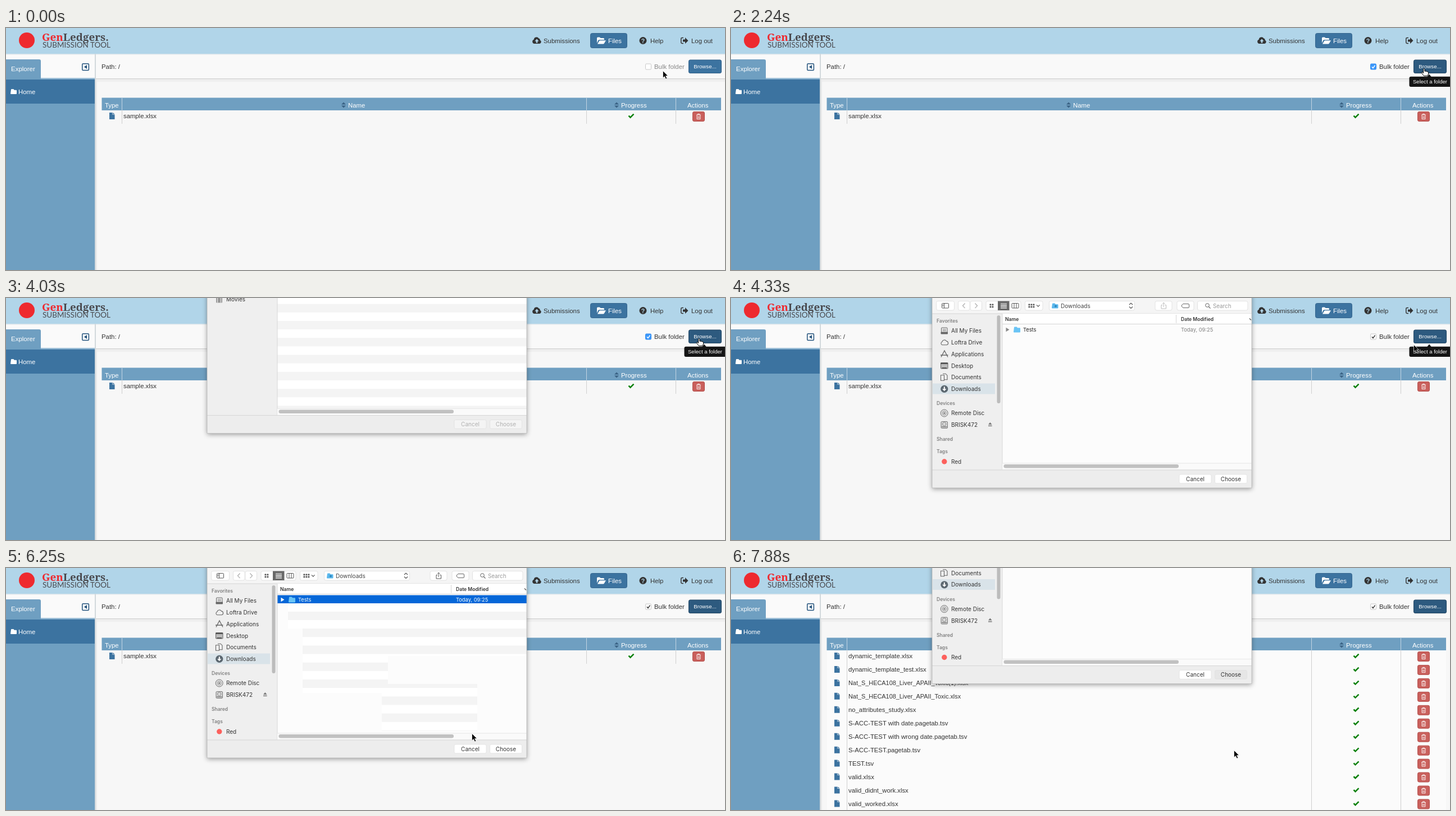
These frames come from a looping animation (1280 by 432 pixels, 8 s). An HTML page:

```html
<!DOCTYPE html>
<html lang="en">
<head>
<meta charset="utf-8">
<title>File upload</title>
<style>
html, body { margin: 0; width: 100%; height: 100%; overflow: hidden; background: #f7f7f7; }
svg { display: block; font-family: "Liberation Sans", Arial, sans-serif; }
#sheet { font-family: Inter, Roboto, sans-serif; }
</style>
</head>
<body>
<svg id="stage" width="1280" height="432" viewBox="0 0 1280 432"></svg>
<script>
const BLUE = '#3c73a0', LIGHT = '#6f9fc1', INK = '#333';

// Markup helpers; text is centred vertically on y
const rect = (x, y, w, h, fill, r = 0, more = '') =>
  `<rect x="${x}" y="${y}" width="${w}" height="${h}" rx="${r}" fill="${fill}" ${more}/>`;
const path = (d, fill, more = '') => `<path d="${d}" fill="${fill}" ${more}/>`;
const line = (d, stroke, width = 1) => path(d, 'none', `stroke="${stroke}" stroke-width="${width}"`);
const circle = (x, y, r, fill, more = '') => `<circle cx="${x}" cy="${y}" r="${r}" fill="${fill}" ${more}/>`;
const text = (x, y, str, size = 11.4, fill = INK, more = '') =>
  `<text x="${x}" y="${y + size * .36}" font-size="${size}" fill="${fill}" ${more}>${str}</text>`;
const group = (id, body, more = '') => `<g id="${id}" ${more}>${body}</g>`;
const at = (x, y, body) => `<g transform="translate(${x} ${y})">${body}</g>`;
const edge = color => `stroke="${color}"`;
const MIDDLE = 'text-anchor="middle"', BOLD = 'font-weight="600"';

const folder = (x, y, w, h, fill) =>
  path(`M${x} ${y + 1}q0-1 1-1h${w * .3}l1.5 1.7h${w * .7 - 4.5}q1 0 1 1v${h - 3.7}q0 1-1 1h${2 - w}q-1 0-1-1z`, fill);

function header() {
  return rect(0, 0, 1280, 46, '#b1d5e9') +
    circle(37, 22, 14, '#ee2a2f') +
    `<text x="64" y="22.5" font-family="Noto Serif, serif" font-weight="700" font-size="18.8" fill="#4a4a4f"><tspan fill="#ee2a2f">Gen</tspan>Ledgers.</text>` +
    text(65, 30.5, 'SUBMISSION TOOL', 13.5, '#4a4a4f', 'font-family="Lato, sans-serif"') +
    path('M940.5 28a3.7 3.7 0 0 1-.8-7.2a4.7 4.7 0 0 1 8.7-2.3a3 3 0 0 1 2.3 3.2a3.3 3.3 0 0 1-.7 6.3z', INK) +
    path('M945 19.5l3.6 4h-2.2v3h-2.8v-3h-2.2z', '#b1d5e9') +
    text(957, 22.5, 'Submissions') +
    rect(1040.5, 9.5, 65, 26, BLUE, 3, edge('#34658e')) +
    path('M1052 27v-9q0-1.5 1.5-1.5h3.5l1.5 1.5h5q1.5 0 1.5 1.5v1.5h-8.5q-1.5 0-2.3 1zM1053 28.5l3.2-5.5q.5-.8 1.5-.8h10.3l-3.3 5.5q-.5.8-1.5.8z', '#fff') +
    text(1072, 22.5, 'Files', 11.4, '#fff') +
    circle(1134, 22.5, 6.5, INK) +
    text(1134, 22.8, '?', 10.5, '#b1d5e9', MIDDLE + ' font-weight="700"') +
    text(1147, 22.5, 'Help') +
    line('M1206 17.5h-2.5q-1.7 0-1.7 1.7v6.6q0 1.7 1.7 1.7h2.5', INK, 1.5) +
    path('M1205 20.5h4v-3.5l5.5 5.5-5.5 5.5v-3.5h-4z', INK) +
    text(1220, 22.5, 'Log out');
}

function sidebar() {
  return rect(0, 46, 158, 44, '#fafafa') +
    path('M0 56h59q3 0 3 3v31h-62z', LIGHT) +
    rect(0, 89, 158, 343, LIGHT) + rect(62, 89, 96, 2, '#9fc0d8') +
    rect(0, 92, 158, 43, BLUE) +
    text(9, 73, 'Explorer', 11.5, '#fff') +
    rect(135.8, 63.8, 11.6, 11.6, 'none', 1.5, edge('#23527c') + ' stroke-width="1.5"') +
    path('M144 66v7l-5-3.5z', '#23527c') +
    folder(9, 109, 11, 9, '#fff') + text(22, 113.5, 'Home', 11.4, '#fff');
}

function pathBar() {
  return rect(160, 46, 1120, 44, '#f9f9f9') +
    rect(0, 46, 1280, 1.5, '#dce6ec') +
    rect(160, 90, 1120, 1.5, '#cfcfcf') + rect(160, 91.5, 1120, 4.5, '#efefef') +
    rect(158, 46, 2, 386, '#d2d8dc') + rect(160, 92, 2, 340, '#ececec') +
    text(170, 69, 'Path: /') +
    rect(1138.5, 64, 10, 10, '#fcfcfc', 1.5, 'id="box"') +
    path('M1141 69.3l2 2.3 3.5-5', 'none', 'id="tick" stroke-width="1.5"') +
    text(1154, 69, 'Bulk folder', 11.4, INK, 'id="bulk"') +
    rect(1215.5, 57, 58, 23.5, BLUE, 2.5, 'id="browse"') +
    text(1244.5, 69, 'Browse...', 9.7, '#fff', MIDDLE);
}

function tableRow(name, i) {
  return at(0, 157 + i * 23.95,
    path('M184-6h5.5v3.5h4v8.5h-9.5zM190.3-6l3.2 2.8h-3.2z', BLUE) +
    text(209, 0, name, name[0] == 'N' ? 10.9 : 11.3) +
    line('M1108.5-.3l3 3 6-6', '#0a800a', 2.5) +
    rect(1222.5, -7.5, 21, 17, '#c9605c', 2.5, edge('#b5504d')) +
    line('M1229-2h8M1231.5-2v-1.5h3v1.5M1230-1.5v7h6v-7M1232 .5v3.5M1234 .5v3.5', '#fff', .9));
}

const columns = (y, h, fill) => [206, 1033, 1192].map(x => rect(x, y, 1, h, fill)).join('');
const sorter = x => path(`M${x} 136.5l4-4 4 4zM${x} 138.5l4 4 4-4z`, '#3a6284');

const uploaded = ['dynamic_template.xlsx', 'dynamic_template_test.xlsx', 'Nat_S_HECA108_Liver_APAII_Toxic(1).xlsx',
  'Nat_S_HECA108_Liver_APAII_Toxic.xlsx', 'no_attributes_study.xlsx', 'S-ACC-TEST with date.pagetab.tsv',
  'S-ACC-TEST with wrong date.pagetab.tsv', 'S-ACC-TEST.pagetab.tsv', 'TEST.tsv', 'valid.xlsx',
  'valid_didnt_work.xlsx', 'valid_worked.xlsx'];

function table() {
  return rect(170.5, 124.5, 1102.5, 22.5, LIGHT) + columns(125, 22, '#c3d5e3') +
    text(176, 137.5, 'Type', 11.4, '#fff') + sorter(597) + text(609, 137.5, 'Name', 11.4, '#fff') +
    sorter(1083) + text(1095, 137.5, 'Progress', 11.4, '#fff') + text(1213, 137.5, 'Actions', 11.4, '#fff') +
    group('before', columns(147, 24, '#cfcfcf') + tableRow('sample.xlsx', 0)) +
    group('after', rect(171, 147, 1102, 285, '#fbfbfb') + columns(147, 285, '#cfcfcf') + uploaded.map(tableRow).join(''));
}

// Every second row of the file list is grey
const ROW = 15.15, LIST_TOP = 47.5;
function stripes(x, y, w, h) {
  let out = rect(x, y, w, h, '#fff');
  for (let row = LIST_TOP; row < y + h; row += 2 * ROW) {
    const top = Math.max(y, row), bottom = Math.min(y + h, row + ROW);
    if (bottom > top) out += rect(x, top, w, bottom - top, '#f4f4f4');
  }
  return out;
}

function toolbar() {
  const button = (x, w) => rect(x, 5.5, w, 16.5, '#fff', 3, edge('#e2e2e2'));
  const grid = (x, y, n) => [...Array(n * 2)].map((_, i) =>
    rect(x + i % n * 4, y + (i / n | 0) * 4, 2.8, 2.8, '#555', .5)).join('');
  return rect(358, 0, 569, 28, '#f5f5f5') + rect(358, 27.5, 569, 1, '#d3d3d3') +
    button(365.5, 32) + rect(375.5, 9.5, 12, 8.5, 'none', 1, edge('#555')) + line('M379.5 9.5v8.5M376.5 12h2M376.5 14h2', '#555') +
    button(404.5, 20.5) + button(426, 20.5) +
    line('M416.5 9.5l-4 4.3 4 4.3M434.5 9.5l4 4.3-4 4.3', '#aaa', 1.2) +
    button(454, 62) + rect(475, 5.5, 20.5, 16.5, '#686868') + grid(460.5, 10.5, 2) +
    line('M480 10h11M480 12.6h11M480 15.2h11M480 17.8h11', '#fff', 1.2) +
    rect(500, 9.5, 12, 8.5, 'none', 1, edge('#555')) + line('M504 9.5v8.5M508 9.5v8.5', '#555') +
    button(523.5, 31.5) + grid(529.5, 10.5, 3) + line('M544 12.3l2.8 2.8 2.8-2.8', '#555', 1.2) +
    button(566.5, 152) + folder(572, 9.5, 11.5, 9, '#5ab7ec') + circle(578, 14.5, 2, '#2d86bd') +
    text(587, 14, 'Downloads', 10, '#444') +
    line('M709 12l3-3 3 3M709 15.5l3 3 3-3', '#555', 1.2) +
    button(755, 30) + path('M768 12.5h-2v6.500h8.500v-6.500h-2M770.2 16v-7.500M768 10.300l2.200-2.200 2.200 2.200', 'none', 'id="share"') +
    button(794, 30) + path('M805 10.5h9q1.5 0 1.5 1.5v4q0 1.5-1.5 1.5h-9l-2.5-2v-3z', 'none', edge('#666')) +
    button(830.5, 89.5) + circle(848, 13, 3.3, 'none', edge('#666')) + line('M850.5 15.5l3 3.2', '#666', 1.2) +
    text(858, 14, 'Search', 9.8, '#999');
}

const disk = rect(374, -6, 11.5, 12, '#d9d9d9', 1.5, edge('#777')) +
  circle(379.7, -1.5, 3.2, 'none', edge('#888')) + line('M375 3.5h9.5', '#777', 1.5);
const page = line('M373.5-4h6v9.5h-6zM377-6.5h5l3 3v7.5h-5', '#666', 1.1);
const places = [
  ['All My Files', 58.5, rect(374.5, -5.5, 10.5, 10.5, '#eee', 1, edge('#666')) + rect(373.5, 2, 12.5, 4, '#666', 1) + line('M376.5-2.5h6.5M376.5 0h6.5', '#777')],
  ['Loftra Drive', 79.3, line('M376 4.5a3 3 0 0 1 0-5.7a4 4 0 0 1 7.5-1a3.4 3.4 0 0 1 .5 6.7z', '#666', 1.1)],
  ['Applications', 100, line('M374 5.5l6-11.5 6 11.5M373 2h13.5', '#666', 1.3)],
  ['Desktop', 121, rect(373.5, -5.5, 12.5, 10.5, '#bbb', .5, edge('#666')) + line('M373.5-4h12.5M375.5 4h8.5', '#555', 2)],
  ['Documents', 141.7, page],
  ['Downloads', 162.3, circle(379.8, 0, 6.6, '#5b6770') + path('M378.8-4h2v4h2.7l-3.7 4-3.7-4h2.7z', '#fff')],
  ['Remote Disc', 205.5, circle(379.7, 0, 6.5, '#ddd', edge('#777')) + circle(379.7, 0, 3.5, 'none', edge('#999')) + circle(379.7, 0, 1.5, '#777')],
  ['BRISK472', 226.5, disk],
  ['Red', 292, circle(379.8, 0, 4.7, '#fc605c')]
];

function sheet() {
  const heading = (str, y) => text(366, y, str, 8.5, '#808080', BOLD);
  const title = (x, str) => text(x, 38, str, 8.6, '#333', BOLD);
  const button = (id, x, str) => rect(x, 315, 57, 15.8, '#fff', 2.5, `id="${id}" stroke="#dedede" stroke-width=".7"`) +
    text(x + 28.5, 323, str, 10, INK, `${MIDDLE} class="label"`);
  return rect(358, -20, 569, 359, '#efefef', 0, 'filter="url(#shadow)"') +
    group('loading', stripes(483, 0, 444, 295) +
      rect(374, 94, 11, 12, '#999', 1) + line('M376.5 94v12M382.5 94v12', '#eee') + text(392, 100, 'Movies', 10)) +
    group('loaded',
      rect(483, 28, 444, 267, '#fcfcfc') +
      group('banding', stripes(502, 63, 178, 45) + stripes(680, 63, 247, 94) + stripes(528, 108, 152, 115) + stripes(669, 207, 170, 84)) +
      toolbar() + rect(483, 28, 444, 18, '#fff') + rect(483, 46, 444, 1, '#d5d5d5') + rect(792, 30, 1, 15, '#d5d5d5') +
      title(488, 'Name') + title(801, 'Date Modified') + line('M923 36.5l3 3', '#555', 1.3) +
      rect(483, 48.5, 444, 14.5, '#0567d8', 0, 'id="selected"') +
      path('M489.5 52.8v7.4l6-3.7z', '#8a8a8a', 'id="arrow"') + folder(504, 51.5, 12, 10, '#6ac4f5') +
      group('entry', text(520, 56.5, 'Tests', 9.3, 'inherit') + text(801, 56.5, 'Today, 09:25', 9.3, 'inherit', 'class="date"')) +
      rect(359, 152.5, 111, 19, '#d9e3e9') +
      places.map(([name, y, icon]) => at(0, y, icon + text(392, 0, name, 10))).join('') +
      path('M458 226l3.3-4 3.3 4zM458 227.5h6.6v1.5h-6.6z', '#777') +
      heading('Favorites', 41) + heading('Devices', 188) + heading('Shared', 252) + heading('Tags', 274) +
      rect(473.5, 31, 6, 157, '#bcbcbc', 3)) +
    rect(482.5, 28, 1, 279, '#d8d8d8') +
    rect(483, 295, 444, 12, '#fafafa') + rect(483, 294.5, 444, 1, '#e8e8e8') + rect(485.5, 297, 311.5, 6.6, '#c1c1c1', 3.3) +
    rect(358, 306.5, 569, 32.5, '#ededed') + rect(358, 306.5, 569, 1, '#d6d6d6') +
    button('cancel', 798, 'Cancel') + button('choose', 861.5, 'Choose') +
    line('M358 0v339h569v-339', '#b9b9b9', .8);
}

const stage = document.getElementById('stage');
stage.innerHTML =
  '<defs><filter id="shadow" x="-10%" y="-10%" width="120%" height="125%"><feDropShadow dx="0" dy="2" stdDeviation="4" flood-opacity=".4"/></filter></defs>' +
  rect(0, 0, 1280, 432, '#f7f7f7') + sidebar() + pathBar() + header() + table() +
  group('tip', path('M1239 87.5l4-5 4 5z', '#151515') + rect(1207.5, 86.8, 78, 18.2, '#151515', 3) + text(1214, 96, 'Select a folder', 9.55, '#fff')) +
  group('sheet', sheet()) +
  group('pointer', path('M.5.5v12.500l2.900-2.600 2.100 4.500 2.200-1-2.100-4.400h3.900z', '#000', 'stroke="#fff" stroke-width=".7"')) +
  group('hand', path('M-.5 1.200q1.200-1.700 2.400 0v4q1.200-1 2.200.3 1.200-.8 2.200.5 1.700-.5 2.200 1.200v2.800l-1.700 3.500h-6.300l-3.900-5q-.8-1.600.8-1.800l2.100 1.700z', '#fff', 'stroke="#000"'));

const $ = id => document.getElementById(id);
const show = (id, on) => { $(id).style.display = on ? '' : 'none'; };
const paint = (id, fill, stroke) => { $(id).style.fill = fill; if (stroke) $(id).style.stroke = stroke; };
const held = (keys, t) => keys.findLast(key => key[0] <= t);

// [time, x, y], each pose held until the next
const pointerKeys = [
  [0, 1169, 76], [140, 1154, 73], [290, 1144, 70],
  [1340, 1147, 70], [1490, 1158, 70], [1640, 1176, 70], [1790, 1195, 70], [1940, 1206, 70],
  [2090, 1222, 71], [2240, 1233, 72],
  [4180, 1228, 76], [4330, 1215, 83], [4480, 1168, 118], [4620, 1120, 142],
  [4770, 1010, 128], [4920, 870, 108], [5070, 735, 88], [5210, 620, 70], [5360, 548, 59], [5500, 525, 55],
  [5950, 528, 94], [6100, 669, 208], [6250, 829, 295], [6400, 884, 321], [6540, 901, 328], [6690, 897, 326],
  [6840, 894, 324], [7140, 895, 325]];
const sheetKeys = [[0, -400], [3890, -230], [4030, -97.5], [4180, 0], [7880, -132.5]];

function render(t) {
  const [, x, y] = held(pointerKeys, t);
  const isHand = t >= 2090 && t < 4330;
  show('hand', isHand);
  show('pointer', !isHand);
  $(isHand ? 'hand' : 'pointer').setAttribute('transform', `translate(${x} ${y})`);

  const checked = t >= 1190, inactive = t >= 4180;
  paint('box', checked && !inactive ? '#3b99fc' : t >= 1040 && !checked ? '#ddd' : '#fff', checked && !inactive ? '#3289ee' : '#c8c8c8');
  show('tick', checked);
  $('tick').style.stroke = inactive ? '#333' : '#fff';
  paint('bulk', checked ? INK : '#888');
  paint('browse', t < 2090 ? BLUE : t >= 3590 && t < 3740 ? '#234560' : '#2d5a7f', t < 2090 ? '#2f5f88' : '#204562');
  show('tip', t >= 2240 && t < 4770);

  const finished = t >= 7880;
  show('before', !finished);
  show('after', finished);

  const ready = t >= 4180, picked = t >= 5650;
  show('sheet', t >= 3890);
  $('sheet').setAttribute('transform', `translate(0 ${held(sheetKeys, t)[1]})`);
  show('loading', !ready);
  show('loaded', ready);
  show('selected', picked);
  show('banding', picked && !finished);
  paint('arrow', picked ? '#fff' : '#8a8a8a');
  $('share').style.stroke = picked ? '#555' : '#bbb';
  document.querySelectorAll('#entry text').forEach(el => {
    el.style.fill = picked ? '#fff' : el.classList.contains('date') ? '#808080' : '#222';
  });
  const pressed = t >= 7740 && !finished;
  paint('cancel', ready ? '#fff' : '#f4f4f4');
  paint('choose', pressed ? '#2f86f6' : finished ? '#e6e6e6' : ready ? '#fff' : '#f4f4f4');
  document.querySelectorAll('.label').forEach((el, i) => {
    el.style.fill = !ready ? '#b0b0b0' : pressed && i ? '#fff' : INK;
  });
}

function tick() {
  render(performance.now() % 8000);
  requestAnimationFrame(tick);
}
tick();
</script>
</body>
</html>
```
